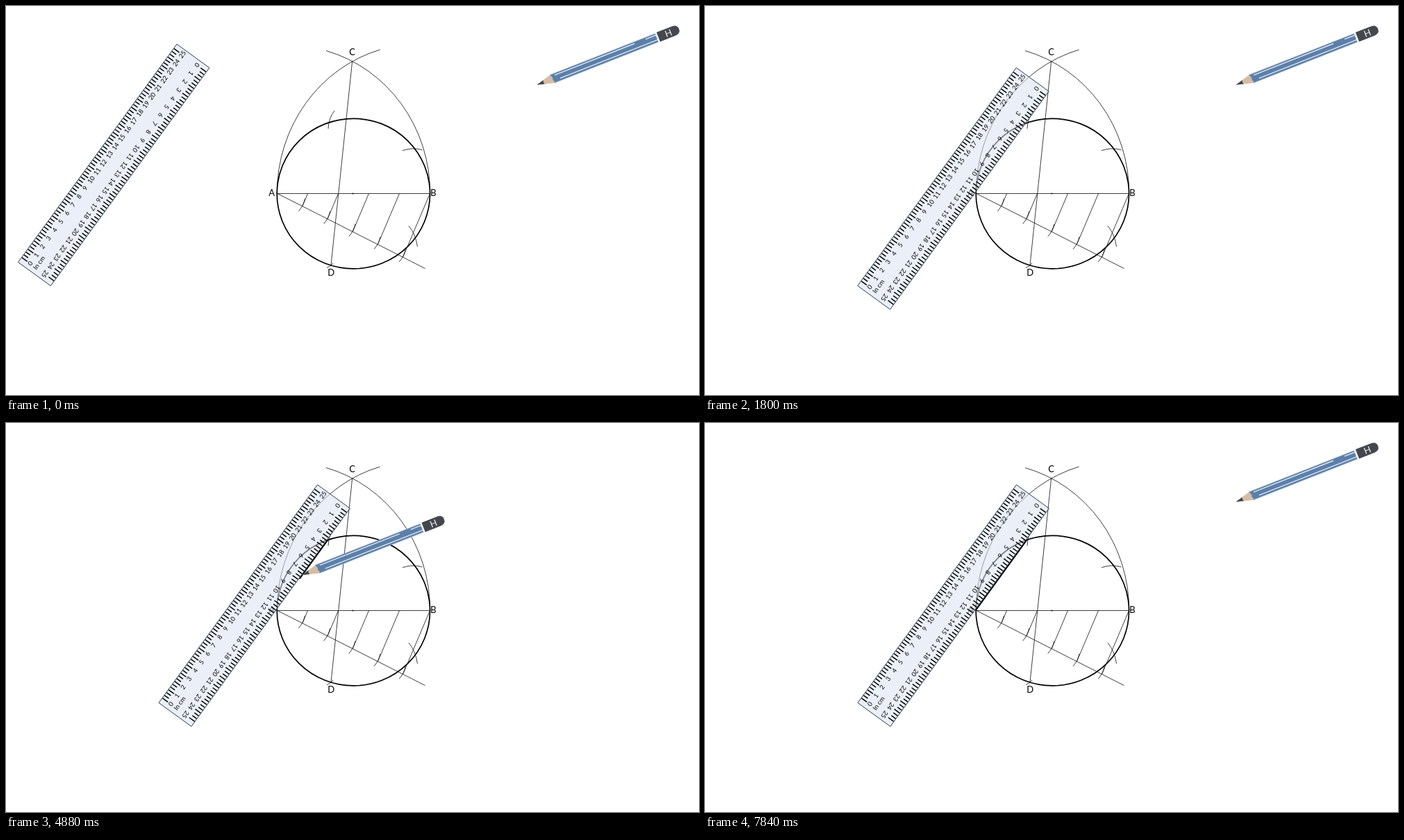
Recreate the animation shown at these times as an HTML page. Size 998 px wide and 561 px high, loop 7880 ms.

```html
<!DOCTYPE html>
<html lang="en">
<head>
<meta charset="utf-8">
<title>Pentagon construction</title>
<style>
  html, body { margin: 0; width: 100%; height: 100%; overflow: hidden; background: #fff; }
  svg { display: block; width: 998px; height: 561px; }
  text { font-family: Lato, "Open Sans", sans-serif; text-anchor: middle; }
</style>
</head>
<body>
<svg viewBox="0 0 998 561" xmlns="http://www.w3.org/2000/svg">
  <g id="drawing" fill="none" stroke="#1c1c1c" stroke-width=".85">
    <path d="M390.3 270.5A204 215.4 0 0 1 538.7 63M610.7 270.5A204 213 0 0 0 461 64.5"/>
    <path d="M390 270.5H611M498.7 79.5L468 374M390.5 270.3L603.5 378.5"/>
    <path d="M464 177Q464.5 162 473 151M571 208.5Q585 203.5 599.5 207.5M580 317Q590 329 592.5 347M462 377.5Q467 376 471 371"/>
    <ellipse cx="500.4" cy="270.6" rx="110.2" ry="108.3" stroke="#000" stroke-width="1.7"/>
    <circle cx="499.5" cy="270.5" r=".9" fill="#000" stroke="none"/>
  </g>
  <g font-size="13">
    <text x="382.7" y="274">A</text>
    <text x="615.5" y="274">B</text>
    <text x="498.5" y="70.5">C</text>
    <text x="468.3" y="388.5">D</text>
  </g>
  <g id="ruler">
    <g id="scale" transform="translate(17.5 369.5) rotate(-54)" font-size="9.2">
      <rect width="388.7" height="58" fill="#dae3f3" fill-opacity=".57" stroke="#2b3a50" stroke-width=".9"/>
      <text x="17" y="28">In cm</text>
    </g>
  </g>
  <path id="side" fill="none" stroke="#000" stroke-width="1.8"/>
  <g id="pencil">
    <g transform="translate(764.5 113.7) rotate(-21.5)">
      <path d="M0 0L24-6.6L26 0L24 6.6Z" fill="#d6bca3"/>
      <path d="M0 0L11-3Q9.5 0 11 3Z" fill="#45474f"/>
      <path d="M22.5-6.5H185.5V6.7H24Q26.5 4 23.5 2Q26-1 22.5-6.5Z" fill="#5c7fa8" stroke="#a9bdd4" stroke-width=".6"/>
      <path d="M29-3.8H152.5M169.7-3.8H186M34.6 3.4H186" stroke="#dde7f1" stroke-width="1.4"/>
      <path d="M188-7.2H213Q220-6.5 220 0Q220 6.5 213 7.2H188Z" fill="#45474f"/>
      <text x="203.5" y="4.7" font-size="13" fill="#f2f2f2">H</text>
    </g>
  </g>
</svg>
<script>
const LOOP = 7880, STEP = 40, MOVE = 1740;
const byId = id => document.getElementById(id);

function add(parent, tag, attrs, label = "") {
  const node = document.createElementNS("http://www.w3.org/2000/svg", tag);
  for (const key in attrs) node.setAttribute(key, attrs[key]);
  node.textContent = label;
  parent.append(node);
}

// Five equal divisions carried up to the diameter.
let divisions = "";
for (let k = 1; k <= 5; k++) {
  const x = 390.7 + 36.2 * k, y = 270.6 + 18.3 * k;
  divisions += `M${390.5 + 44 * k} 270.5L${x} ${y}M${x - 5.5} ${y + 7}A40 40 0 0 0 ${x + 3.5} ${y - 11}`;
}
add(byId("drawing"), "path", { d: divisions });

// Both edges carry the same scale, one of them upside down.
const scale = byId("scale"), CM = 14.9, TICKS_PER_CM = 3;
let ticks = "";
for (let i = 0; i <= 25 * TICKS_PER_CM; i++) {
  const x = 8.6 + i * CM / TICKS_PER_CM, length = i % TICKS_PER_CM ? 7.5 : 9.5;
  ticks += `M${x} .5v${length}M${x} 57.5v${-length}`;
}
add(scale, "path", { d: ticks, stroke: "#000", "stroke-width": 1.5 });
for (let n = 0; n <= 25; n++) {
  const x = 9 + CM * n;
  add(scale, "text", { x, y: 18.4 }, n);
  add(scale, "text", { transform: `translate(${390.5 - x} 37.9) rotate(180)` }, n);
}

const clamp = u => Math.min(1, Math.max(0, u));
function ease(t, start) {
  const u = clamp((t - start) / MOVE);
  return u < .5 ? 2 * u * u : 1 - 2 * (1 - u) ** 2;
}
const place = (id, x, y) => byId(id).setAttribute("transform", `translate(${x} ${y})`);

function render(t) {
  const slide = ease(t, 104);
  place("ruler", 202.5 * slide, 34 * slide);

  const approach = ease(t, 2066), stroke = ease(t, 4022), back = ease(t, 5990);
  place("pencil",
    -304 * approach - 70.5 * stroke + 374.5 * back,
    57 * approach + 100 * stroke - 157 * back);

  const drawn = clamp((t - 4022) / 1540);
  byId("side").setAttribute("d", drawn > .02 ? `M464 168L${464 - 74 * drawn} ${168 + 102 * drawn}` : "");
}

const origin = performance.now();
function frame() {
  const t = (performance.now() - origin) % LOOP;
  render(Math.floor(t / STEP) * STEP);
  requestAnimationFrame(frame);
}
render(0);
requestAnimationFrame(frame);
</script>
</body>
</html>
```
